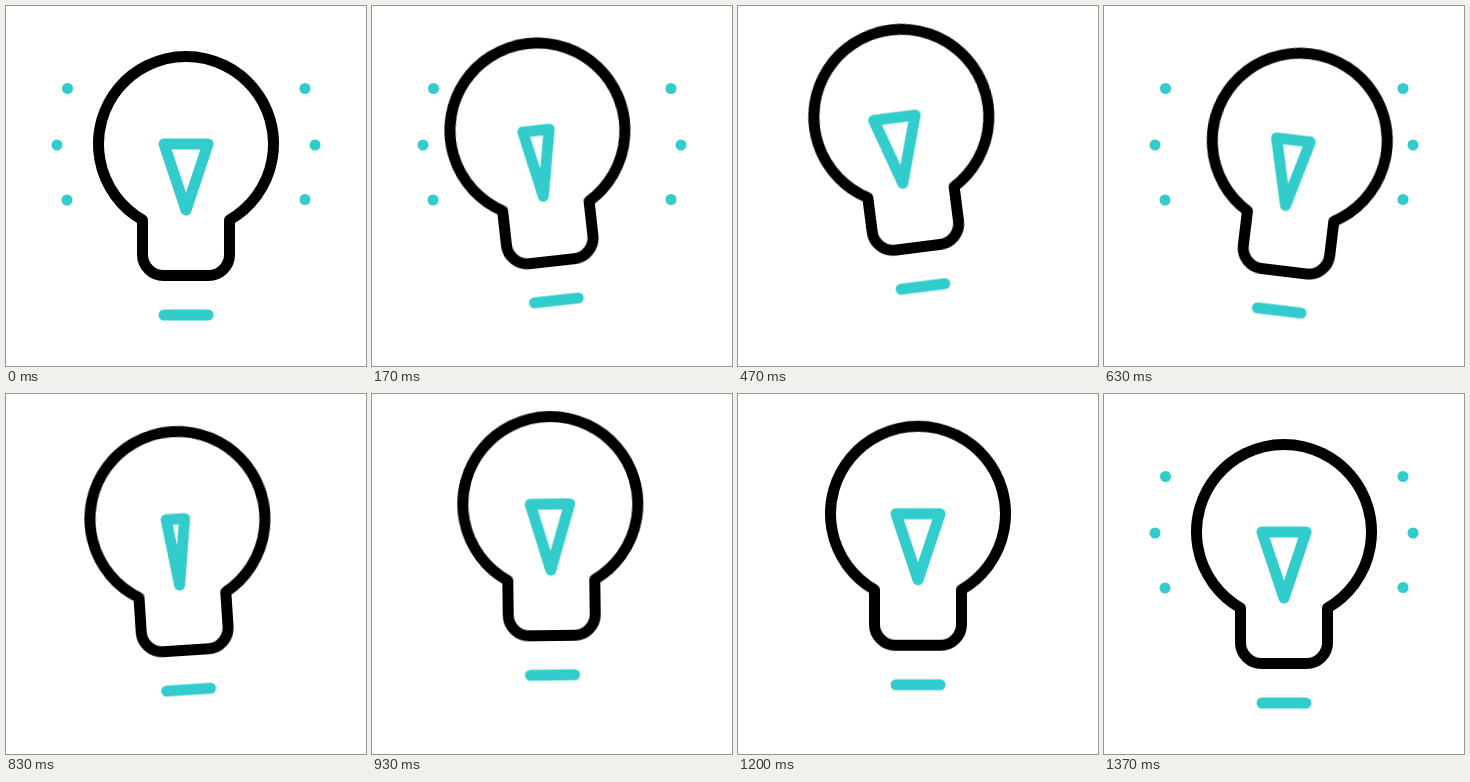
These frames come from a looping animation (360 by 360 pixels, 1670 ms). An HTML page:

```html
<!DOCTYPE html>
<html lang="en">
<head>
<meta charset="utf-8">
<title>Light bulb</title>
<style>
  html, body { margin: 0; width: 100%; height: 100%; overflow: hidden; background: #fff; }
  svg { display: block; width: 100%; height: 100%; }

  .line { fill: none; stroke: #000; stroke-width: 11; stroke-linecap: round; stroke-linejoin: round; }
  .teal { stroke: #3cc; }
  .dots { fill: #3cc; animation: blink 1670ms step-end infinite; }

  .hop, .swing, .spin {
    animation: hop 1670ms cubic-bezier(.333, 0, .667, 1) infinite;
  }
  .swing { transform-origin: 180px 269.5px; animation-name: swing; }
  .spin { transform-origin: 176.4px 138px; animation-name: spin; vector-effect: non-scaling-stroke; }

  @keyframes hop {
    0%, 1.9% { transform: translateY(0); animation-timing-function: cubic-bezier(.27, 0, .68, 1); }
    22.3% { transform: translateY(-36px); }
    42% { transform: translateY(0); animation-timing-function: cubic-bezier(.27, 0, .68, 1); }
    62% { transform: translateY(-36px); }
    82%, 100% { transform: translateY(0); }
  }
  @keyframes swing {
    0%, 1.8% { transform: rotate(0deg); }
    20.6% { transform: rotate(-15deg); }
    40% { transform: rotate(7.7deg); }
    50% { transform: rotate(-3.75deg); }
    61% { transform: rotate(1.9deg); }
    72%, 100% { transform: rotate(0deg); }
  }
  @keyframes spin {
    0%, 1.9% { transform: scaleX(1); }
    31%, 32% { transform: scaleX(-1); }
    59.6%, 100% { transform: scaleX(1); }
  }
  @keyframes blink {
    0%, 30%, 58%, 82%, 100% { opacity: 1; }
    16%, 44%, 70% { opacity: 0; }
  }
</style>
</head>
<body>
<svg viewBox="0 0 360 360">
  <g class="dots">
    <circle cx="61.5" cy="82.5" r="5.5"/>
    <circle cx="51" cy="139" r="5.5"/>
    <circle cx="61" cy="194" r="5.5"/>
    <circle cx="299" cy="82.5" r="5.5"/>
    <circle cx="309" cy="139" r="5.5"/>
    <circle cx="299" cy="193.5" r="5.5"/>
  </g>
  <g class="hop">
    <g class="swing">
      <path class="line" d="M136.5 213.9A87.5 87.5 0 1 1 223.5 213.9V248.5A21 21 0 0 1 202.5 269.5H157.5A21 21 0 0 1 136.5 248.5Z"/>
      <path class="line teal" d="M158 309H202"/>
      <path class="line teal spin" d="M158 138H202L180 204Z"/>
    </g>
  </g>
</svg>
</body>
</html>
```
